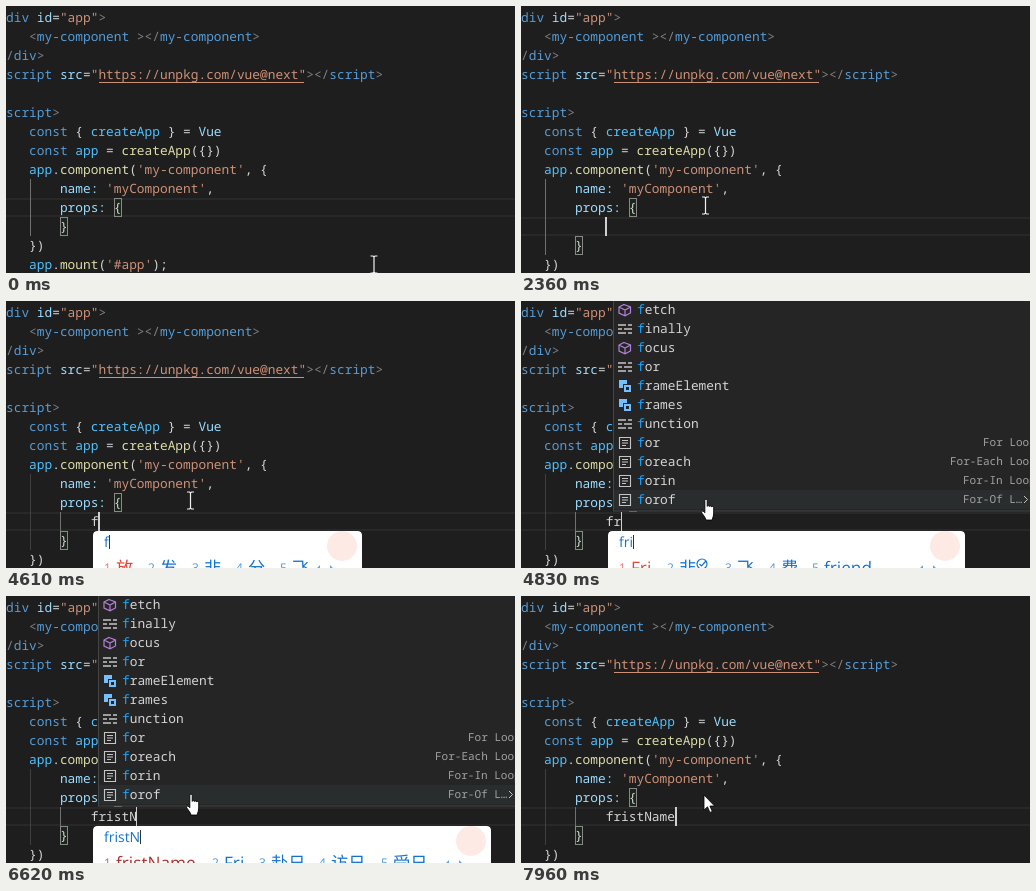
These frames come from a looping animation (509x267 px, 8000 ms). An HTML page:

```html
<!DOCTYPE html>
<html lang="en">
<head>
<meta charset="utf-8">
<title>Editor typing</title>
<style>
  html, body { margin: 0; width: 100%; height: 100%; overflow: hidden; background: #1e1e1e; }
  svg { display: block; width: 509px; height: 267px; }
  text { white-space: pre; text-rendering: geometricPrecision; font-variant-ligatures: none; }
  .mono { font: 12.83px "Noto Sans Mono", monospace; fill: #d4d4d4; }
  .detail { font: 11px "Noto Sans Mono", monospace; fill: #a0a0a0; }
  .ime { font: 14px "Open Sans", "Noto Sans CJK SC", sans-serif; fill: #1273cf; }
  .word { font-size: 17.2px; }
  .digit { font-size: 12px; opacity: .75; }
  .match { fill: #0064001a; stroke: #888; }
  .caret { fill: #d0d0cc; }
  .pointer { fill: #fff; stroke: #000; stroke-width: .8; }
</style>
</head>
<body>
<svg viewBox="0 0 509 267">
  <defs>
    <g id="cube" fill="none" stroke="#b180d7" stroke-width="1.2"><path d="M6 1.5 12.5 4v6L7 12.8 1 10V4zM1 4l6 3 5.5-3M7 7v5.8"/></g>
    <g id="keyword" stroke="#c5c5c5" stroke-width="1.3"><path d="M0 3h8M10 3h4M0 7h4M6 7h8M0 11h8M10 11h4"/></g>
    <g id="variable" fill="#75beff"><path d="M1 1h8v4H5v4H1z"/><path d="M6 6h7v7H6z"/><path d="M8 8h3v3H8z" fill="#252526"/></g>
    <g id="snippet" fill="none" stroke="#c5c5c5" stroke-width="1.1"><path d="M1.5 1.5h11v11h-11zM4 4.5h6M4 7h6M4 9.5h4"/></g>
    <clipPath id="panelClip"><rect id="panelClipBox" x="87" y="230" height="50" rx="4"/></clipPath>
  </defs>

  <rect id="activeLine" x="-2" y="193" width="513" height="17" fill="none" stroke="#282828" stroke-width="2"/>
  <path id="outerGuide" stroke="#404040"/>
  <path d="M54.5 211v19" stroke="#707070" data-on="4610-8000"/>
  <rect class="match" x="108.5" y="192.5" width="7" height="18"/>
  <g id="code" class="mono"></g>
  <g id="tail" class="mono"><rect class="match" x="54.5" y="211.5" width="7" height="18"/></g>
  <path d="M93 76.5H298" stroke="#ce9178"/>
  <text id="typed" class="mono" x="84.7" y="225"></text>
  <rect id="caret" class="caret" width="2" height="19"/>

  <g id="suggest" data-on="4830-7960">
    <rect x="92.5" y="-2" width="440" height="212" fill="#252526" stroke="#454545"/>
    <rect x="93" y="189" width="416" height="19" fill="#2a2d2e"/>
  </g>

  <g id="panel" data-on="4610-7960" clip-path="url(#panelClip)">
    <rect id="panelBox" x="87" y="230" height="50" rx="4" fill="#fff"/>
    <circle id="emblem" cy="245" r="15" fill="#fdeae4"/>
    <text id="composed" class="ime" x="98" y="246"></text>
    <rect id="panelCaret" y="234" width="1" height="14" fill="#333"/>
    <g id="words"></g>
  </g>

  <circle cx="182" cy="198.5" r="12" fill="#ffff00" fill-opacity=".47" data-on="350-570"/>
  <path id="beam" d="M-3.5-8.5h2.5l1 1 1-1h2.5M0-7.5v15M-3.5 8.5h2.5l1-1 1 1h2.5" fill="none" stroke="#f0f0f0" stroke-width="1.2" data-on="0-4830"/>
  <path class="pointer" data-on="4830-7960" transform="translate(180.6 198) scale(1.08)"
    d="M3 1.3c0-1.5 2.2-1.5 2.2 0v5.5c0-1 2-1 2 .2c0-.9 2-.9 2 .4c0-.9 2-.7 2 .6v5q0 2.600-1.500 6.500h-5.500q-1-3-4-6.500c-1-1.500.700-2.500 1.800-1.300l1 1z"/>
  <path class="pointer" data-on="7960-8000" transform="translate(183 199)" d="M0 0v15l3.500-3.200 2.400 5.600 2.400-1-2.400-5.400h4.700z"/>
</svg>
<script>
const LOOP = 8000, CELL = 7.7, ROW = 19;
const $ = id => document.getElementById(id);
const set = (el, attrs) => { for (const k in attrs) el.setAttribute(k, attrs[k]); return el; };

function add(parent, tag, attrs, text) {
  const el = set(document.createElementNS('http://www.w3.org/2000/svg', tag), attrs);
  if (text) el.textContent = text;
  parent.append(el);
  return el;
}

// Each token starts with its colour key.
const COLORS = { t: '#569cd6', g: '#808080', a: '#9cdcfe', s: '#ce9178', f: '#dcdcaa', c: '#4fc1ff', p: '#d4d4d4' };
function codeLine(parent, row, indent, ...tokens) {
  const line = add(parent, 'text', { x: (indent - 1) * CELL, y: 16 + row * ROW });
  for (const token of tokens) add(line, 'tspan', { fill: COLORS[token[0]] }, token.slice(1));
}

const code = $('code'), tail = $('tail');
codeLine(code, 0, 0, 'g<', 'tdiv', 'a id', 'p=', 's"app"', 'g>');
codeLine(code, 1, 4, 'g<', 'tmy-component', 'g ></', 'tmy-component', 'g>');
codeLine(code, 2, 0, 'g</', 'tdiv', 'g>');
codeLine(code, 3, 0, 'g<', 'tscript', 'a src', 'p=', 's"https://unpkg.com/vue@next"', 'g></', 'tscript', 'g>');
codeLine(code, 5, 0, 'g<', 'tscript', 'g>');
codeLine(code, 6, 4, 'tconst', 'p { ', 'ccreateApp', 'p } = ', 'aVue');
codeLine(code, 7, 4, 'tconst', 'c app', 'p = ', 'fcreateApp', 'p({})');
codeLine(code, 8, 4, 'capp', 'p.', 'fcomponent', 'p(', "s'my-component'", 'p, {');
codeLine(code, 9, 8, 'aname:', "s 'myComponent'", 'p,');
codeLine(code, 10, 8, 'aprops:', 'p {');
codeLine(tail, 11, 8, 'p}');
codeLine(tail, 12, 4, 'p})');
codeLine(tail, 13, 4, 'capp', 'p.', 'fmount', 'p(', "s'#app'", 'p);');

[
  ['cube', 'fetch'], ['keyword', 'finally'], ['cube', 'focus'], ['keyword', 'for'],
  ['variable', 'frameElement'], ['variable', 'frames'], ['keyword', 'function'],
  ['snippet', 'for', 'For Loop', 462], ['snippet', 'foreach', 'For-Each Loop', 429],
  ['snippet', 'forin', 'For-In Loop', 442], ['snippet', 'forof', 'For-Of L…', 442]
].forEach(([icon, name, detail, x], i) => {
  const y = 8 + i * ROW, list = $('suggest');
  add(list, 'use', { href: '#' + icon, x: 97, y: y - 6 });
  const label = add(list, 'text', { class: 'mono', x: 116, y: y + 5 });
  add(label, 'tspan', { fill: '#18a3ff' }, name[0]);
  add(label, 'tspan', {}, name.slice(1));
  if (detail) add(list, 'text', { class: 'detail', x, y: y + 4 }, detail);
});
add($('suggest'), 'path', { d: 'M503 195l3.500 3.500-3.500 3.500', fill: 'none', stroke: '#c5c5c5' });

// Candidate pages: right edge, first colour, badge position, then x and word pairs.
const PAGES = [
  { right: 356, first: '#e0453a', words: [[98, '放'], [142, '发'], [186, '非'], [230, '分'], [274, '飞']] },
  { right: 444, first: '#e0453a', badge: 181, words: [[98, 'Fri.'], [146, '非'], [204, '飞'], [248, '费'], [291, 'friend']] },
  { right: 490, first: '#a8322c', badge: 221, words: [[98, 'fris'], [152, '飞日式'], [245, 'friend'], [314, '赴日'], [376, '访日']] },
  { right: 467, first: '#a8322c', badge: 226, words: [[98, 'frist'], [157, '飞上天'], [249, 'Fri.'], [296, '赴日'], [357, '访日']] },
  { right: 485, first: '#a8322c', words: [[98, 'fristName'], [206, 'Fri.'], [253, '赴日'], [313, '访日'], [375, '受日']] }
];
const pageGroups = PAGES.map(({ right, first, badge, words }) => {
  const page = add($('words'), 'g', { class: 'ime' });
  words.forEach(([x, word], i) => {
    const style = i ? '' : 'fill:' + first;
    add(page, 'text', { class: 'digit', x, y: 271, style }, i + 1 + '.');
    add(page, 'text', { class: 'word', x: x + 12, y: 273, style }, word);
  });
  if (badge) add(page, 'path', {
    d: `M${badge - 5} 263a5 5 0 1 0 10 0a5 5 0 1 0-10 0m2.500 0l2 2 4-4.500`, fill: 'none', stroke: '#1273cf', 'stroke-width': 1.2
  });
  add(page, 'path', { d: `M${right - 42} 264l-4 4 4 4zM${right - 32} 264l4 4-4 4z`, fill: '#6ba4dc' });
  return page;
});

// Time, text in the editor, text in the input panel, candidate page.
const TYPING = [
  [0, '', '', 0], [4610, 'f', 'f', 0], [4830, 'fr', 'fri', 1], [5050, 'fris', 'fris', 2],
  [5290, 'frist', 'frist', 3], [6620, 'fristN', 'fristN', 4],
  [6840, 'fristNam', 'fristNam', 4], [7070, 'fristName', 'fristName', 4]
];
const BEAM = [[0, 368, 258.5], [70, 270, 226], [130, 184.5, 199.5]];
const CARET_OFF = [[0, 350], [1020, 1470], [1920, 2360], [3050, 3500], [3940, 4380], [5740, 6400], [7510, 7960]];
const PANEL_CARET_OFF = [[5740, 6620], [7510, 7960]];

const latest = (steps, t) => steps.findLast(step => step[0] <= t);
const within = (spans, t) => spans.some(([from, to]) => t >= from && t < to);
const show = (el, on) => { el.style.display = on ? '' : 'none'; };
const timed = [...document.querySelectorAll('[data-on]')].map(el => [el, [el.dataset.on.split('-').map(Number)]]);

function render(t) {
  for (const [el, spans] of timed) show(el, within(spans, t));
  const opened = t >= 2360;
  set($('activeLine'), { y: opened ? 212 : 193 });
  set(tail, { transform: `translate(0 ${opened ? ROW : 0})` });
  set($('outerGuide'), { d: `M24.5 173V${opened ? 249 : 230}`, stroke: t < 4610 ? '#707070' : '#404040' });

  const [, typed, composed, index] = latest(TYPING, t);
  $('typed').textContent = typed;
  set($('caret'), opened ? { x: Math.floor(84.7 + typed.length * CELL), y: 211 } : { x: 184, y: 192 });
  set($('caret'), { width: t >= 4830 && t < 7960 ? 1 : 2 });
  show($('caret'), !within(CARET_OFF, t));

  const { right } = PAGES[index];
  set($('panelBox'), { width: right - 87 });
  set($('panelClipBox'), { width: right - 87 });
  set($('emblem'), { cx: right - 20 });
  $('composed').textContent = composed;
  if (t >= 4610 && t < 7960) set($('panelCaret'), { x: Math.round(98 + $('composed').getComputedTextLength()) });
  show($('panelCaret'), !within(PANEL_CARET_OFF, t));
  pageGroups.forEach((page, i) => show(page, i === index));

  const [, x, y] = latest(BEAM, t);
  set($('beam'), { transform: `translate(${x} ${y})` });
}

const start = performance.now();
function tick() {
  render((performance.now() - start) % LOOP);
  requestAnimationFrame(tick);
}
tick();
</script>
</body>
</html>
```
